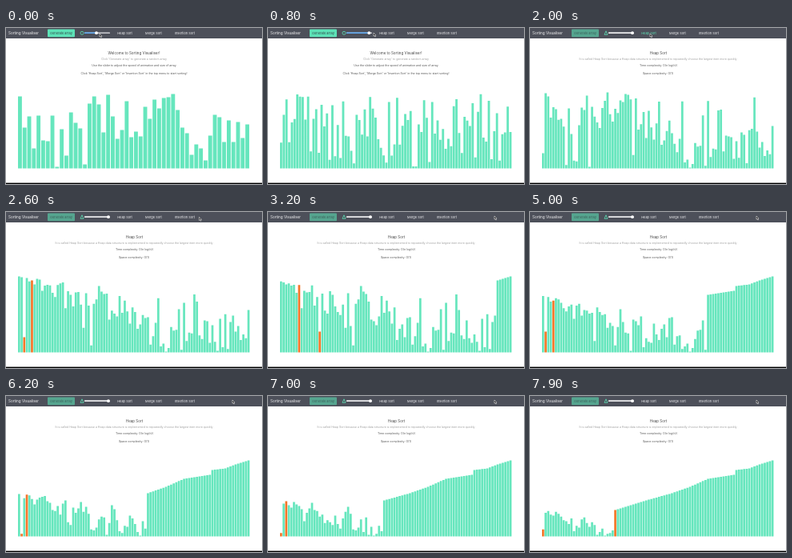
Write an HTML page that moves like this. It is 320x195 px and loops after 8000 ms.

```html
<!DOCTYPE html>
<html lang="en">
<head>
<meta charset="utf-8">
<title>Sorting Visualiser</title>
<style>
  html, body { margin: 0; width: 100%; height: 100%; overflow: hidden; background: #fff; }
  svg { display: block; width: 100vw; height: 100vh; }
  text { font-family: Inter, "Open Sans", sans-serif; font-size: 3.5px; fill: #555; }
  .mid { text-anchor: middle; }
  .head { font-size: 4.5px; fill: #444; }
  .soft { fill: #a0a0a0; }
  .menu { font-size: 3.95px; fill: #f4f4f6; }
</style>
</head>
<body>
<svg viewBox="0 0 320 195" preserveAspectRatio="none">
  <rect width="320" height="195" fill="#fff"/>
  <rect width="320" height="13" fill="#4d505a"/>
  <text x="3" y="8.1" class="menu" style="font-size:4.6px">Sorting Visualiser</text>
  <rect id="button" x="52" y="1.5" width="34" height="9.7" rx="1"/>
  <text id="label" x="69" y="7.8" class="menu mid">Generate array</text>
  <circle id="ring" cx="95" cy="6.3" r="2" fill="none" stroke="#5de2b7" stroke-width=".8"/>
  <path id="mark" d="M95 3.8 L97 8.3 H93 Z" fill="none" stroke="#5de2b7" stroke-width=".8"/>
  <rect x="98" y="5.5" width="32" height="1.3" rx=".6" fill="#e8e8ec"/>
  <rect id="fill" x="98" y="5.5" height="1.3" rx=".6"/>
  <circle id="thumb" cy="6.2" r="1.9" fill="#fff"/>
  <text id="heapLink" x="148.5" y="8" class="menu mid">Heap Sort</text>
  <text x="184.5" y="8" class="menu mid">Merge Sort</text>
  <text x="223.5" y="8" class="menu mid">Insertion Sort</text>
  <g id="welcome" class="mid">
    <text x="160" y="33" class="head">Welcome to Sorting Visualiser!</text>
    <text x="160" y="40" class="soft">Click 'Generate array' to generate a random array</text>
    <text x="160" y="47.6">Use the slider to adjust the speed of animation and size of array</text>
    <text x="160" y="57.6">Click 'Heap Sort', 'Merge Sort' or 'Insertion Sort' in the top menu to start sorting!</text>
  </g>
  <g id="about" class="mid">
    <text x="160.5" y="33" class="head">Heap Sort</text>
    <text x="160" y="40" class="soft">It is called Heap Sort because a Heap data structure is implemented to repeatedly choose the largest item more quickly</text>
    <text x="160.5" y="47.6">Time complexity: O(n log(n))</text>
    <text x="160" y="57.6">Space complexity: O(1)</text>
  </g>
  <path id="bars" fill="#66e6bd"/>
  <path id="hot" fill="#f4772a"/>
  <rect y="193.6" width="320" height="1.4" fill="#000"/>
  <path id="cursor" d="M0 0 V4.2 L1 3.3 L1.8 5 L2.5 4.7 L1.8 3.1 H3 Z" fill="#222" stroke="#fff" stroke-width=".5"/>
</svg>
<script>
const LOOP = 8000, STEP = 100, LEFT = 15, WIDTH = 290, BASE = 175.5;
const SORT_START = 2000, EXTRACT_START = 2660, STEPS_PER_SECOND = 68;
const $ = id => document.getElementById(id);

const firstBars = [
  90, 51, 65, 25, 66, 35, 34, 66, 2, 49, 16, 70, 57, 50, 5, 81, 90, 80, 45, 92, 65, 37, 48, 84, 39,
  46, 40, 77, 62, 86, 75, 88, 89, 93, 73, 51, 44, 17, 30, 25, 10, 41, 67, 64, 33, 60, 33, 58, 38, 55];
const rough = [
  18, 95, 90, 70, 82, 75, 69, 69, 60, 7, 78, 50, 12, 9, 62, 80, 74, 91, 5, 83, 70, 66, 58, 79, 84,
  95, 72, 66, 77, 72, 84, 83, 92, 91, 85, 17, 86, 57, 62, 72, 47, 72, 58, 45, 63, 83, 30, 41, 53, 67,
  50, 30, 20, 45, 83, 8, 12, 2, 7, 30, 28, 28, 71, 5, 83, 15, 23, 22, 73, 74, 20, 49, 48, 47, 12,
  40, 14, 50, 49, 7, 53, 57, 86, 50, 25, 33, 16, 20, 17, 60];

// Linear interpolation of the columns after the first in rows of [x, ...values].
function track(rows, x) {
  const k = rows.findIndex(r => r[0] > x);
  if (k < 0) return rows[rows.length - 1].slice(1);
  if (k === 0) return rows[0].slice(1);
  const a = rows[k - 1], b = rows[k], f = (x - a[0]) / (b[0] - a[0]);
  return a.slice(1).map((v, i) => v + (b[i + 1] - v) * f);
}

const sortedCurve = [[0, 1], [10, 12], [28, 33], [40, 45], [50, 54], [57, 62], [64, 72],
  [74, 77], [75, 83], [80, 85], [84, 90], [89, 95]];
const cursorPath = [[0, 117, 7], [800, 132, 6], [900, 136, 4], [1000, 137, 4], [1100, 137, 4],
  [1500, 150, 7], [2100, 150, 7], [2800, 278, 6], [3100, 283, 5]];

function randomBars(n) {
  let seed = n * 7919;
  return Array.from({ length: n }, () => {
    seed = (seed * 16807) % 2147483647;
    return 2 + 92 * seed / 2147483647;
  });
}

// Snap the rough heights to the smooth curve that the sorted bars form.
const order = rough.map((_, i) => i).sort((a, b) => rough[a] - rough[b]);
const sortBars = [];
order.forEach((i, rank) => sortBars[i] = track(sortedCurve, rank)[0]);

function buildSort() {
  const a = sortBars.slice(), shots = [];
  let steps = [];
  const record = (...hot) => steps.push({ bars: a.slice(), hot });
  const swap = (i, j) => { [a[i], a[j]] = [a[j], a[i]]; };
  function sift(i, n) {
    for (;;) {
      let c = 2 * i + 1;
      if (c >= n) return;
      if (c + 1 < n && a[c + 1] > a[c]) c++;
      if (a[c] <= a[i]) return;
      record(i, c);
      swap(i, c);
      record(i, c);
      i = c;
    }
  }
  function place(from, to) {
    steps.forEach((s, k) => shots.push({ ...s, time: from + (to - from) * k / steps.length }));
    steps = [];
  }

  record();
  for (let i = a.length / 2 - 1; i >= 0; i--) sift(i, a.length);
  place(SORT_START, EXTRACT_START);

  let time = EXTRACT_START;
  for (let n = a.length; n > 1 && time < LOOP; n--) {
    const next = time + 1000 * Math.log2(n) / STEPS_PER_SECOND;
    swap(0, n - 1);
    record(0, n - 1);
    sift(0, n - 1);
    place(time, next);
    time = next;
  }
  return shots;
}
const shots = buildSort();

function stateAt(t) {
  if (t >= SORT_START) return shots.findLast(s => s.time <= t);
  const n = 50 + Math.round(40 * Math.min(t / 900, 1));
  const bars = n === 50 ? firstBars : n === 90 ? sortBars : randomBars(n);
  return { bars, hot: [] };
}

function drawBars({ bars, hot }) {
  const pitch = WIDTH / bars.length, w = pitch * 0.84;
  let plain = "", marked = "";
  bars.forEach((h, i) => {
    const d = `M${(LEFT + i * pitch).toFixed(2)} ${BASE}v${(-h).toFixed(2)}h${w.toFixed(2)}v${h.toFixed(2)}z`;
    if (hot.includes(i)) marked += d; else plain += d;
  });
  $("bars").setAttribute("d", plain);
  $("hot").setAttribute("d", marked);
}

const show = (id, on) => $(id).setAttribute("visibility", on ? "visible" : "hidden");

function render(t) {
  const sliding = t < 1000, chosen = t >= 1700;
  const thumb = 113 + 15 * Math.min(t / 900, 1);
  drawBars(stateAt(t));
  show("welcome", !chosen);
  show("about", chosen);
  show("ring", sliding);
  show("mark", !sliding);
  $("thumb").setAttribute("cx", thumb);
  $("fill").setAttribute("width", thumb - 98);
  $("fill").setAttribute("fill", sliding ? "#3f9bf5" : "#f4f4f6");
  $("button").setAttribute("fill", chosen ? "#55a58f" : "#5de2b7");
  $("label").style.fill = chosen ? "#3c5f5a" : "#33474a";
  $("heapLink").style.fill = t >= 1400 && t < 2300 ? "#5de2b7" : "";
  const [x, y] = track(cursorPath, t);
  $("cursor").setAttribute("transform", `translate(${x} ${y})`);
}

const start = performance.now();
function tick() {
  const t = (performance.now() - start) % LOOP;
  render(Math.floor(t / STEP) * STEP);
  requestAnimationFrame(tick);
}
render(0);
requestAnimationFrame(tick);
</script>
</body>
</html>
```
